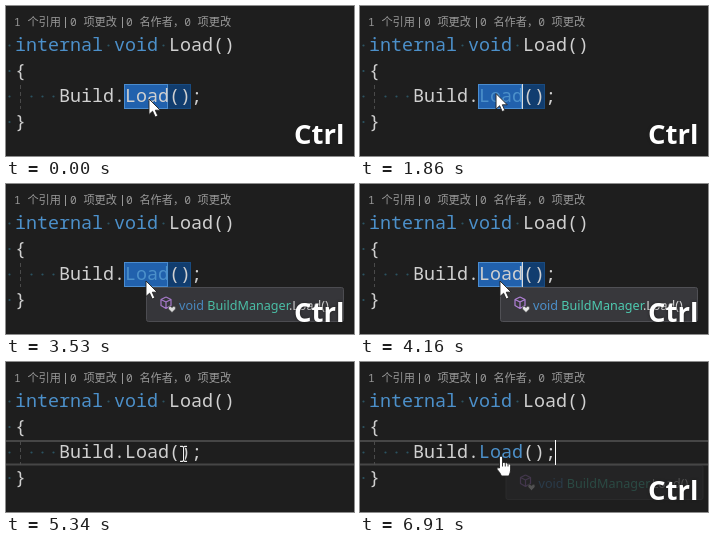
Animation, 348 px wide and 150 px high, one loop 7.91 s. Source, as an HTML page:

```html
<!DOCTYPE html>
<html lang="zh">
<head>
<meta charset="utf-8">
<title>Ctrl + hover</title>
<style>
html, body { margin: 0; width: 100%; height: 100%; overflow: hidden; background: #1e1e1e; }
svg { display: block; width: 348px; height: 150px; }
text { white-space: pre; }
.code { font: 200 18.333px "Noto Sans Mono", "DejaVu Sans Mono", monospace; fill: #d0d0d0; }
.lens { font: 11.2px "Noto Sans Mono", "Noto Sans CJK SC", "Noto Sans CJK", monospace; fill: #999; }
.tip { font: 12.6px "Noto Sans", "Open Sans", sans-serif; fill: #dcdcdc; }
.key { font: bold 27.5px "Open Sans", "Noto Sans", sans-serif; fill: #fff; text-shadow: 0 0 3px #1e1e1e; }
.kw { fill: #4c90ca; }
.type { fill: #4ec9b0; }
</style>
</head>
<body>
<svg viewBox="0 0 348 150">
  <defs>
    <path id="ibeam" d="M-3.5 -7.5H-1L0 -6.5L1 -7.5H3.5M0 -6.5V6.5M-3.5 7.5H-1L0 6.5L1 7.5H3.5"/>
  </defs>
  <rect width="348" height="150" fill="#1e1e1e"/>
  <g class="lens">
    <text x="8" y="19.5">1 个引用</text>
    <text x="64" y="19.5">0 项更改</text>
    <text x="120" y="19.5">0 名作者，0 项更改</text>
    <path d="M59.5 11V22M116.5 11V22" stroke="#999"/>
  </g>

  <path id="line" d="M0 79H348M0 102.5H348" stroke="#464646" stroke-width="2"/>
  <rect id="range" x="118.5" y="78.5" width="66" height="24" fill="#113d6f" stroke="#194b80"/>
  <rect id="pick" x="118.5" y="78.5" width="43" height="24" fill="#2161ad" stroke="#4a8ccf"/>
  <path d="M14.5 79V103" stroke="#4a4a4a" stroke-dasharray="4 3"/>

  <g id="code" class="code"></g>
  <rect id="mid" x="162" y="78" width="1" height="25" fill="#dcdcdc"/>
  <rect id="end" x="195" y="78" width="1" height="25" fill="#fff"/>

  <g id="tip">
    <rect x=".5" y="103.5" width="197" height="34" rx="2" fill="#38383c" stroke="#505055"/>
    <path d="M20 113L25 115.5V121.5L20 124.5L15 121.5V115.5L20 118L25 115.5M20 118V124.5M15 115.5L20 113"
      fill="none" stroke="#b180d7" stroke-width="1.2" stroke-linejoin="round"/>
    <path d="M26 128.5L22.5 125Q22 122 24.3 122.3L26 123.5L27.7 122.3Q30 122 29.5 125Z" fill="#e8e8e8" stroke="#38383c" stroke-width=".6"/>
    <text class="tip" x="33" y="126"><tspan class="kw">void</tspan> <tspan class="type">BuildManager</tspan>.Load()</text>
  </g>

  <text id="key" class="key" x="288" y="137.5">Ctrl</text>
  <circle id="click" cx="203" cy="88.5" r="12" fill="#d8c51c" opacity=".8"/>

  <path id="arrow" d="M0 0V15.5L3.6 12.2L6.2 18L8.8 16.8L6.3 11.2H11.2Z" fill="#fff" stroke="#222" stroke-width=".9"/>
  <g id="beam" fill="none">
    <use href="#ibeam" stroke="#111" stroke-width="2.6"/>
    <use href="#ibeam" stroke="#eee" stroke-width="1.1"/>
  </g>
  <g id="hand" stroke="#222" stroke-width=".9" stroke-linejoin="round">
    <path d="M-1.5 1Q0 -1 1.5 1V7Q3 5.5 4.3 7.2Q6 6 7 7.8Q9.3 7 9.6 9.5V14Q9.4 17 7.8 20H.5Q-1 16.5 -4 13.2Q-4.6 10.6 -1.5 12Z" fill="#fff"/>
    <path d="M1.5 7V10.5M4.3 7.5V10.5M7 8V10.5"/>
  </g>
</svg>
<script>
const LOOP = 7910, CELL = 11, LEFT = -2, TOP = 45, PITCH = 25.5;
const $ = id => document.getElementById(id);

const lines = [
  ' <tspan class="kw">internal void</tspan> Load()',
  ' {',
  '     Build.<tspan id="link">Load</tspan>();',
  ' }'
];

// Each line of code, with a dot for every visible space
function codeLine(html, row) {
  const plain = html.replace(/<[^>]*>/g, '');
  const indent = plain.search(/\S/);
  const y = TOP + row * PITCH;
  const dots = [...plain].map((ch, col) => ch !== ' ' || col === 1 ? '' :
    `<circle cx="${LEFT + (col + 0.5) * CELL}" cy="${y - 5.5}" r="1.1" fill="#2b5361"/>`);
  return `<text x="${LEFT + indent * CELL}" y="${y}">${html.trim()}</text>${dots.join('')}`;
}
$('code').innerHTML = lines.map(codeLine).join('');

const ramp = (t, from, to) => Math.min(1, Math.max(0, (t - from) / (to - from)));
const within = (t, from, to) => t >= from && t < to;
const blink = (t, from, period) => t >= from && Math.floor((t - from) / period) % 2 === 0;
const show = (id, on) => $(id).setAttribute('visibility', on ? 'visible' : 'hidden');

// The pointer rests, then glides to the next spot
const glides = [
  { from: 380, to: 690, x: 140, y: 91 },
  { from: 840, to: 1410, x: 134, y: 87 },
  { from: 1640, to: 2400, x: 141, y: 89 },
  { from: 2490, to: 3110, x: 140, y: 97 },
  { from: 4180, to: 4640, x: 204, y: 90 },
  { from: 5030, to: 5700, x: 147, y: 94 },
  { from: 6040, to: 6200, x: 141, y: 94 }
];

function pointerAt(t) {
  let x = 143, y = 93;
  for (const g of glides) {
    const u = ramp(t, g.from, g.to);
    x += (g.x - x) * u;
    y += (g.y - y) * u;
  }
  return `translate(${x} ${y})`;
}

// Holding Ctrl makes the tooltip see-through
function tipOpacity(t) {
  const faint = 0.25;
  if (t < 3400) return faint * ramp(t, 2180, 2400);
  if (t < 5000) return t < 4320 ? faint + (1 - faint) * ramp(t, 3440, 3540) : 0;
  return ramp(t, 5640, 5800) - (1 - faint) * ramp(t, 6040, 6200);
}

function draw(t) {
  const pointer = t < 4440 ? 'arrow' : t < 6120 ? 'beam' : 'hand';
  for (const id of ['arrow', 'beam', 'hand']) show(id, id === pointer);
  $(pointer).setAttribute('transform', pointerAt(t));

  const linked = within(t, 460, 3610) || t >= 6120;
  $('link').setAttribute('class', linked ? 'kw' : '');

  const clicked = t >= 4640;
  show('pick', !clicked);
  show('range', t < 4780);
  show('line', clicked);
  show('click', within(t, 4600, 4860));
  show('key', t < 4480 || t >= 6040);
  show('mid', t < 4340 && blink(t, 630, 530));
  show('end', blink(Math.min(t, 6910), 4710, 540));

  $('tip').setAttribute('opacity', tipOpacity(t));
  $('tip').setAttribute('transform', `translate(${t < 5000 ? 140 : 145.5} 0)`);
}

const start = performance.now();
function tick() {
  draw((performance.now() - start) % LOOP);
  requestAnimationFrame(tick);
}
tick();
</script>
</body>
</html>
```
